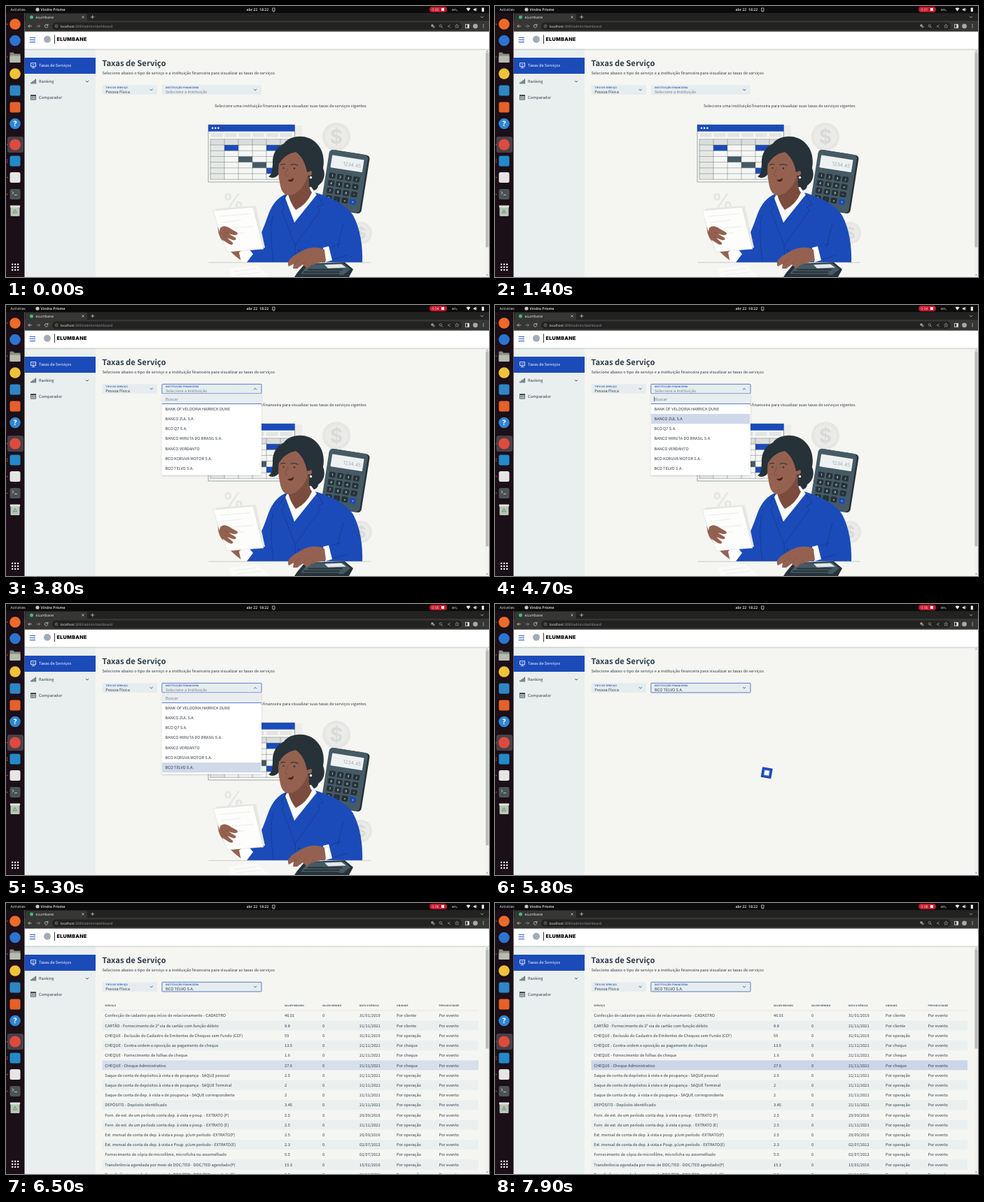
Write an HTML page that moves like this. It is 690x388 px and loops after 8 s.

```html
<!DOCTYPE html>
<html lang="pt">
<head>
<meta charset="utf-8">
<title>Taxas de Serviço</title>
<style>
html, body { margin: 0; width: 100%; height: 100%; overflow: hidden; background: #f5f6f2; }
svg { display: block; width: 100%; height: 100%; }
text { font: 5.67px "Noto Sans CJK JP", "Noto Sans CJK SC", "Noto Sans CJK", "Noto Sans", sans-serif; fill: #303c47; text-rendering: geometricPrecision; white-space: pre; }
.ui { font: 5.2px "Open Sans", "Noto Sans", sans-serif; fill: #eee; }
.bold { font-weight: 600; }
.url { font-size: 4.83px; fill: #9aa0a6; }
.tiny { font-size: 3.3px; font-weight: 700; letter-spacing: .27px; }
.head { font-size: 11.24px; font-weight: 700; fill: #2c3d4c; }
.brand { font: 900 7.1px Inter, sans-serif; letter-spacing: .35px; fill: #0b0b0b; }
.blue { fill: #1b4bb9; }
.pale { fill: #75808a; }
.white { fill: #fff; }
.key { font: 600 4.6px Inter, sans-serif; fill: #dfe6e9; }
.line { fill: none; stroke-linecap: round; stroke-linejoin: round; }
</style>
</head>
<body>
<script>
const BLUE = '#1b4bb9', NAVY = '#12358c', SLATE = '#455a64', INK = '#263238', SKIN = '#946150', SHADE = '#7b4c3e';
const LOOP = 8000;

const text = (x, y, s, cls = '', more = '') => `<text x="${x}" y="${y}" class="${cls}" ${more}>${s}</text>`;
const rect = (x, y, w, h, fill, more = '') => `<rect x="${x}" y="${y}" width="${w}" height="${h}" fill="${fill}" ${more}/>`;
const disc = (x, y, r, fill, more = '') => `<circle cx="${x}" cy="${y}" r="${r}" fill="${fill}" ${more}/>`;
const path = (d, fill, more = '') => `<path d="${d}" fill="${fill}" ${more}/>`;
const line = (d, color, w = .7) => `<path class="line" d="${d}" stroke="${color}" stroke-width="${w}"/>`;
const group = (id, body, more = '') => `<g id="${id}" ${more}>${body}</g>`;
const times = (n, f) => Array.from({ length: n }, (_, i) => f(i)).join('');

// Desktop bar, browser tabs and address bar
function chrome() {
  return rect(0, 0, 690, 10, '#0b0b0b')
    + text(6.5, 6.9, 'Activities', 'ui') + disc(45, 5, 2.6, '#c8c8c8')
    + text(49.5, 6.9, 'Vindra Prisme', 'ui bold')
    + text(343.5, 6.9, 'abr 22  18:22', 'ui bold')
    + line('M381 3h3v4.2h-3zM382 8h1', '#ddd')
    + rect(605, 1, 25, 8, '#c7162b', 'rx="4"')
    + `<text id="clock" class="ui" x="608.3" y="6.9"></text>` + rect(622, 3, 4, 4, '#fff')
    + text(637, 6.9, 'en₁', 'ui')
    + path('M657.5 3.6q3-2 6 0l-3 4z', '#eee')
    + path('M668 4h1.4l2-1.6v5.4l-2-1.6H668z', '#eee') + line('M672.4 3.8q1 1.3 0 2.6', '#eee', .5)
    + rect(679.7, 2.6, 3.2, 5.6, '#eee', 'rx=".6"')
    + rect(26.5, 10, 663.5, 12, '#222221') + rect(28, 11, 88, 12, '#363634', 'rx="2"')
    + rect(26.5, 21, 663.5, 15.6, '#363634')
    + disc(36.5, 16, 2.5, '#41b883') + text(42.5, 17.9, 'eLumbane', 'ui')
    + line('M108.7 14.6l2.6 2.6m0-2.6l-2.6 2.6M121.5 15.8h4.4m-2.2-2.2v4.4M678.2 15l1.8 1.8 1.8-1.8', '#ddd')
    + line('M36.6 28.8h-4.6m2-2l-2 2 2 2', '#ddd')
    + line('M43.8 28.8h4.6m-2-2l2 2-2 2', '#9a9a9a')
    + line('M59.6 27.6a2.3 2.3 0 1 0 .2 1.9M60 26.2v1.7h-1.7', '#ddd')
    + rect(66, 23.5, 585, 10.8, '#222221', 'rx="5.4"')
    + disc(72, 28.8, 2, 'none', 'stroke="#aaa" stroke-width=".5"') + line('M72 28.6v1.2M72 27.6v0', '#aaa', .5)
    + `<text class="ui url" x="77.5" y="30.5"><tspan fill="#e8eaed">localhost</tspan>:3000/admin/dashboard</text>`
    + rect(607.5, 26.5, 3, 3, '#aaa') + rect(609.5, 28.3, 3, 3, '#777')
    + disc(620.8, 28.3, 1.7, 'none', 'stroke="#bbb" stroke-width=".6"') + line('M622 29.6l1.5 1.6', '#bbb')
    + line('M631.5 29l3-1.8m-3 1.8l3 1.8', '#bbb', .6)
    + line('M644.3 26.2l.8 1.8 2 .2-1.5 1.3.5 1.9-1.8-1-1.8 1 .5-1.9-1.5-1.3 2-.2z', '#bbb', .5)
    + rect(656.6, 26.3, 5, 5, 'none', 'stroke="#ddd" stroke-width=".8"') + rect(659.2, 26.3, 2.6, 5, '#ddd')
    + disc(670.5, 28.8, 3.4, '#a9a9a4')
    + times(3, i => disc(682, 26.7 + i * 2, .6, '#ddd'));
}

function dock() {
  const dot = (y) => disc(1.8, y, .8, '#e95420');
  const tile = (y, c) => rect(5.5, y - 7.5, 15, 15, c, 'rx="2.5"');
  return rect(0, 10, 26.5, 378, '#1b0f18') + rect(2, 187, 23, 23, '#4a3f47', 'rx="3"')
    + disc(13, 26, 7.8, '#ee6a28') + disc(13, 49.5, 7.8, '#2b74cf')
    + path('M5.5 66.5h5l1.5 2h8.5V81h-15z', '#8a8f86') + rect(5.5, 71.5, 15, 9.5, '#b7bbae', 'rx="1"')
    + disc(13, 97, 7.8, '#f0c23a') + tile(121, '#2f86c4') + tile(145, '#e6602a')
    + disc(13, 168.5, 7.8, '#2f86d3') + text(13, 172.3, '?', 'ui', 'text-anchor="middle" style="font-size:10.5px;font-weight:700;fill:#fff"')
    + disc(13, 198.5, 8, '#dc4b3e') + tile(222, '#2489ca') + tile(245.5, '#e6e6e4')
    + tile(269.5, '#4b5455') + line('M9 266l2 1.6-2 1.6M12.5 270.5h3', '#eee')
    + rect(6.5, 286, 13, 15, '#b9c4b6', 'rx="1.5"') + rect(5.8, 285.5, 14.4, 3, '#dfe4dc', 'rx="1"')
    + line('M10.6 296h4.8l-2.4-4.2z', '#4f8f5b', .9)
    + [26, 73, 198.5, 220.5, 223.5, 245.5, 269.5].map(dot).join('')
    + times(9, i => rect(8 + i % 3 * 4, 368.8 + Math.floor(i / 3) * 4, 2.2, 2.2, '#f2f2f2', 'rx=".5"'));
}

function shell() {
  return rect(26.5, 61, 101.5, 327, '#e9efee')
    + rect(684.6, 62, 5.4, 326, '#f1f1ef')
    + rect(26.5, 61.4, 663.5, 2.4, 'url(#drop)') + rect(26.5, 36.6, 663.5, 24.8, '#fff')
    + line('M34.2 45.3h7.4M34.2 48.4h5.4M34.2 51.6h7.4', BLUE, 1) + line('M40.3 47.2l1.6 1.2-1.6 1.2', BLUE, .7)
    + disc(59, 47.8, 5, '#a3acb5') + rect(69.1, 41.5, .9, 12.5, '#222')
    + text(72.5, 50.4, 'ELUMBANE', 'brand')
    + rect(26.5, 74, 101.5, 23, BLUE)
    + rect(35.6, 81.7, 7, 4.8, 'none', 'stroke="#fff" stroke-width=".8"') + line('M39 86.5v2M37 88.6h4.2M38 84h2.4', '#fff')
    + text(47, 87.3, 'Taxas de Serviços', 'white')
    + times(4, i => rect(35.3 + i * 2.1, 109.2 - i * 1.5, 1.4, 2.2 + i * 1.5, SLATE))
    + text(47, 110, 'Ranking') + line('M114.2 107.2l1.8 1.8 1.8-1.8', '#37444f', .9)
    + rect(35.5, 127.5, 7, 6.6, 'none', 'stroke="#37444f" stroke-width=".8"') + rect(35.5, 127.5, 7, 1.8, '#37444f')
    + line('M35.8 131.5h6.4M37.9 129.5v4.4M40.2 129.5v4.4', '#37444f', .6)
    + text(47, 132.9, 'Comparador')
    + text(137.3, 86.4, 'Taxas de Serviço', 'head')
    + text(137.5, 97.8, 'Selecione abaixo o tipo de serviço e a instituição financeira para visualizar as taxas de serviços')
    + rect(137.5, 113.3, 78.5, 13.6, '#e6edee', 'rx="1"') + rect(222.8, 113.3, 142.2, 13.6, '#e6edee', 'rx="1" id="field"')
    + text(142.3, 117.5, 'TIPO DE SERVIÇO', 'tiny blue') + text(228, 117.5, 'INSTITUIÇÃO FINANCEIRA', 'tiny blue')
    + text(142.3, 124.6, 'Pessoa Física') + `<text id="value" x="228" y="124.6"></text>`
    + line('M206 119.2l1.7 1.7 1.7-1.7', BLUE, .9)
    + `<path id="arrow" class="line" stroke="${BLUE}" stroke-width=".9"/>`
    + path('M686 65.3l1.4-1.6 1.4 1.6zM686 384.6l1.4 1.6 1.4-1.6z', '#777')
    + rect(685.4, 66.5, 4, 279, '#b9bab8', 'id="thumb"');
}

function calculator() {
  const keys = ['123/', '456×', '789−', '0.=+'];
  const pad = keys.map((row, r) => [...row].map((k, c) => {
    const x = -23.4 + c * 11.6, y = -9.2 + r * 10.8;
    return rect(x, y, 9, 8, r == 3 && c == 3 ? BLUE : INK, 'rx="1.5"')
      + text(x + 4.5, y + 5.7, k, 'key', 'text-anchor="middle"');
  }).join('')).join('');
  return `<g transform="translate(484 251) rotate(9)">` + rect(-26, -42, 56, 84.5, INK, 'rx="5"')
    + rect(-28.5, -42, 56, 84, SLATE, 'rx="5"') + rect(-23.5, -34.5, 46, 18, '#eef1f2', 'rx="1"')
    + text(19.5, -22.5, '1234.45', '', 'text-anchor="end" style="font:300 7px Inter,sans-serif;fill:#8b979d"') + pad + '</g>';
}

function coin(x, y, r) {
  return disc(x, y, r, '#e6e7e4') + disc(x, y, r * .8, '#ebece9')
    + text(x, y + r * .5, '$', '', `text-anchor="middle" style="font:700 ${r * 1.4}px Inter,sans-serif;fill:#d9dbd8"`);
}

function sheet() {
  const cell = (c, r, fill) => rect(292 + c * 20, 199 + r * 8.2, 20, 8.2, fill);
  return rect(402, 171, 21, 74, '#ececea') + rect(289, 170, 123.5, 82, '#f6f7f5', 'stroke="#455" stroke-width=".5"')
    + rect(289, 170, 123.5, 9.6, BLUE) + times(3, i => disc(295 + i * 4.2, 174.8, 1.3, '#fff'))
    + times(6, i => rect(292.5 + i * 19.8, 182, 17, 5.6, '#e3e5e3'))
    + rect(292, 191, 117, 8, '#dcdedc') + rect(292, 199, 20, 49, '#e6e8e6')
    + cell(1, 0, BLUE) + cell(4, 0, BLUE) + cell(2, 2, SLATE) + cell(3, 3, SLATE) + cell(4, 4, BLUE)
    + line(times(8, i => `M292 ${(190.8 + i * 8.2).toFixed(1)}h117`) + times(6, i => `M${292 + i * 20} 191v57.2`), '#5b6769', .45);
}

function woman() {
  return path('M397 197C406 184 432 183 444 197C454 207 455 222 453 232C457 242 454 252 446 257C446 263 438 267 431 263L424 250L391 238C388 246 380 248 375 244C381 241 380 234 381 226C380 212 387 201 397 197Z', INK)
    + path('M401 269C389 273 380 284 375 298C369 314 364 332 352 342L335 352L343 367H509C510 345 506 318 496 300C488 286 466 274 441 267L412 310Z', BLUE)
    + path('M405 264L436 259L444 270L412 310L399 275Z', '#fcfcfa')
    + path('M405 256L433 244C432 255 433 262 437 267Q430 284 414 292Q406 282 403 269Z', SHADE)
    + path('M391 220C396 206 414 203 422 211C430 222 434 238 430 247C425 260 414 271 404 271C396 271 392 262 391 252C388 240 389 229 391 220Z', SKIN)
    + disc(433, 239, 4, SKIN) + disc(435.5, 245.5, 1.7, '#fff')
    + path('M386 226C388 206 398 196 410 196C428 198 435 214 436 236L430 238C428 226 423 215 414 209C404 211 396 216 391 225Z', INK)
    + line('M392.8 227.5q3-2 6-.8M407 227.5q5-2.4 10 .8', INK, 1.1)
    + disc(396.5, 232, 1.1, INK) + disc(412, 232.5, 1.2, INK)
    + line('M402.5 232q-2 6-4 10q1 2.3 4.5 1.4', SHADE, .8)
    + path('M402 249q5 .5 9-3q0 5-4 5.6q-3 0-5-2.6z', '#4f211d')
    + line('M400 272L393 283L398 288L394 293L413 343L414 366M443 268L453 284L445 288L449 293L413 343M381 300Q376 322 382 366M482 312Q476 330 474 346', NAVY, .7)
    + disc(418, 350, 1.2, NAVY);
}

function paper() {
  return path('M303 310Q312 302 321 313L334 339L346 350L338 366Q318 352 309 336Q301 326 303 310Z', SKIN)
    + path('M333 353L343 343L353 355L344 367H336Z', '#fff')
    + path('M300 290L357 286L370 346L320 352Z', '#e6e8e6')
    + path('M296 293L353 288L368 348L316 352Q304 324 296 293Z', '#fdfdfb', 'stroke="#c8cccb" stroke-width=".4"')
    + line(times(4, i => `M${306 + i * 2.4} ${301 + i * 9}l${i % 2 ? 27 : 42}-3.4`), '#e6e8e5', .8)
    + path('M306 318Q311 312 321 319L330 324Q333 328 326 328L318 326L328 332Q330 336 324 335L316 332L324 339Q325 343 319 341L308 334Q303 326 306 318Z', SKIN)
    + line('M318 326l-5-2M316 332l-4-3', SHADE, .6);
}

function desk() {
  return path('M318 376L358 371L377 388H322Z', '#fafaf8') + line('M326 380l32-4M330 385l34-4', '#e8eae7', .8)
    + line('M290 367.2H521', '#a9afae', .6)
    + path('M427 369L484 367L496 377L490 388H412L416 382Z', INK) + path('M431 370L482 368.5L492 377L482 385H420Z', SLATE)
    + path('M455 370.5L479 369.6L486 374.5L460 375.5Z', '#e4e8e9')
    + line('M432 377.5h48M426 381h50M421 384.5h54', INK, 1.8)
    + line('M456 366L487 357M464 345L478 340', NAVY, .7)
    + path('M453 346L461 344L466 364L456 367Z', '#fff')
    + path('M455 349C446 344 434 345 424 350L412 357C404 362 401 368 404 373L411 369L410 376L416 376L424 370L430 376L436 371L446 368L457 365Z', SKIN)
    + line('M411 369L420 362M424 370L430 363M436 371L440 365', SHADE, .6);
}

function picture() {
  return text(406.3, 144.8, 'Selecione uma instituição financeira para visualizar suas taxas de serviços vigentes', '', 'text-anchor="middle"')
    + coin(472, 187, 20) + coin(507, 325, 16)
    + text(325, 290, '%', '', 'text-anchor="middle" style="font:700 30px Inter,sans-serif;fill:#e5e7e4"')
    + sheet() + calculator() + woman() + paper() + desk();
}

const PICKED = 'BCO TELVO S.A.';
const banks = ['BANK OF VELDORIA HARRICK DUNE', 'BANCO ZUL S.A', 'BCO Q7 S.A.', 'BANCO MIRUTA DO BRASIL S.A.', 'BANCO VERDANTO', 'BCO KORUVA MOTOR S.A.', PICKED];
const PITCH = 14.22;

function menu() {
  return rect(222.8, 127.5, 142.2, 116, '#fff', 'filter="url(#shade)"')
    + rect(222.8, 127.5, 142.2, 14, '#e8edef') + rect(222.8, 141.1, 142.2, .7, BLUE)
    + text(228, 136.6, 'Buscar', 'pale') + rect(227.4, 131.3, .6, 6.6, '#222', 'id="caret"')
    + rect(223.2, 0, 141, PITCH, '#cfd9ea', 'id="hover"')
    + banks.map((b, i) => text(227.5, 150.8 + i * PITCH, b)).join('');
}

const columns = [[141.3, 'SERVIÇO'], [398, 'VALOR MÁXIMO'], [452, 'VALOR MÍNIMO'], [505, 'DATA VIGÊNCIA'], [558, 'UNIDADE'], [618.5, 'PERIODICIDADE']];
const fees = `Confecção de cadastro para início de relacionamento - CADASTRO|46.01|31/01/2019|cliente
CARTÃO - Fornecimento de 2ª via de cartão com função débito|8.8|21/11/2021|cliente
CHEQUE - Exclusão do Cadastro de Emitentes de Cheques sem Fundo (CCF)|55|31/01/2019|operação
CHEQUE - Contra-ordem e oposição ao pagamento de cheque|13.5|21/11/2021|cheque
CHEQUE - Fornecimento de folhas de cheque|1.6|21/11/2021|cheque
CHEQUE - Cheque Administrativo|27.6|21/11/2021|cheque
Saque de conta de depósitos à vista e de poupança - SAQUE pessoal|2.5|21/11/2021|operação
Saque de conta de depósitos à vista e de poupança - SAQUE Terminal|2|21/11/2021|operação
Saque de conta de dep. à vista e de poupança - SAQUE correspondente|2|21/11/2021|operação
DEPÓSITO - Depósito Identificado|3.45|21/11/2021|operação
Forn. de ext. de um período conta dep. à vista e poup. - EXTRATO (P)|2.5|29/09/2016|operação
Forn. de ext. de um período conta dep. à vista e poup. - EXTRATO (E)|2.5|21/11/2021|operação
Ext. mensal de conta de dep. à vista e poup. p/um período -EXTRATO(P)|2.5|29/09/2016|operação
Ext. mensal de conta de dep. à vista e Poup. p/um período - EXTRATO(E)|2.3|02/07/2012|operação
Fornecimento de cópia de microfilme, microficha ou assemelhado|5.5|02/07/2012|operação
Transferência agendada por meio de DOC/TED - DOC/TED agendado(P)|15.3|15/01/2016|operação
Transferência agendada por meio de DOC/TED - DOC/TED agendado(E)|9.5|21/11/2021|operação`.split('\n').map(r => r.split('|'));

function table() {
  const row = ([name, max, date, unit], i) => {
    const y = 154.2 + i * PITCH, cells = [name, max, '0', date, 'Por ' + unit, 'Por evento'];
    return rect(137.5, y, 537.5, PITCH, i % 2 ? '#eaf0ef' : '#f5f6f2')
      + (i == 5 ? rect(137.5, y, 537.5, PITCH, '#cbd6e9', 'id="marked"') : '')
      + cells.map((s, c) => text(columns[c][0], y + 9.2, s)).join('');
  };
  return columns.map(([x, s]) => text(x, 147.9, s, 'tiny')).join('')
    + group('rows', fees.map(row).join('')) + rect(137.5, 153.6, 537.5, .6, '#d9dfdf');
}

const spinner = rect(-7.4, -7.4, 14.8, 14.8, BLUE) + rect(-4.2, -4.2, 8.4, 8.4, '#5f83d3') + rect(-3.3, -3.3, 6.6, 6.6, '#f8f9fa');

document.body.innerHTML = `<svg viewBox="0 0 690 388" preserveAspectRatio="none">
<defs><filter id="shade" x="-10%" y="-10%" width="120%" height="120%"><feDropShadow dx="0" dy="1" stdDeviation="1.3" flood-opacity=".22"/></filter>
<linearGradient id="drop" x2="0" y2="1"><stop stop-opacity=".2"/><stop offset="1" stop-opacity="0"/></linearGradient></defs>`
  + rect(0, 0, 690, 388, '#f5f6f2') + group('picture', picture()) + group('table', table())
  + shell() + group('spinner', spinner) + group('menu', menu()) + dock() + chrome() + '</svg>';

const el = id => document.getElementById(id);
const set = (id, attrs) => { for (const k in attrs) el(id).setAttribute(k, attrs[k]); };
const show = (id, on) => set(id, { visibility: on ? 'visible' : 'hidden' });
const ramp = (t, from, span) => Math.max(0, Math.min(1, (t - from) / span));

const OPEN = 1880, PICK = 5780, LOADED = 6280, FILLED = 6380;
const hovers = [[4680, 1], [4780, 2], [4880, 3], [4980, 4], [5080, 5], [5280, 6]];

function draw(t) {
  const open = t >= OPEN && t < PICK, picked = t >= PICK, loaded = t >= LOADED;
  el('clock').textContent = '0:0' + Math.floor((t + 220) / 1000);
  el('value').textContent = picked ? PICKED : 'Selecione a Instituição';
  set('value', { class: picked ? '' : 'pale' });
  set('field', { stroke: t >= OPEN ? BLUE : 'none', 'stroke-width': .7 });
  set('arrow', { d: open ? 'M354.4 121l1.7-1.7 1.7 1.7' : 'M354.4 119.2l1.7 1.7 1.7-1.7' });

  show('menu', open);
  const grow = ramp(t, OPEN, 110);
  set('menu', { opacity: grow, transform: `translate(0 ${127.5 * .2 * (1 - grow)}) scale(1 ${.8 + .2 * grow})` });
  set('caret', { opacity: Math.floor((t - 1980) / 600) % 2 ? 0 : 1 });
  const hover = hovers.filter(h => t >= h[0]).pop();
  set('hover', { opacity: hover ? 1 : 0, y: 141.7 + (hover ? hover[1] : 0) * PITCH });

  show('picture', !picked);
  show('spinner', picked && !loaded);
  set('spinner', { transform: `translate(388.2 241.8) rotate(${6 + (t - PICK) * .18})` });
  show('table', loaded);
  set('rows', { opacity: t >= FILLED ? 1 : 0 });
  set('marked', { opacity: ramp(t, FILLED, 200) });
  show('thumb', !picked || loaded);
  set('thumb', { height: loaded ? 142 : 279 });
}

function tick() {
  draw(performance.now() % LOOP);
  requestAnimationFrame(tick);
}
tick();
</script>
</body>
</html>
```
